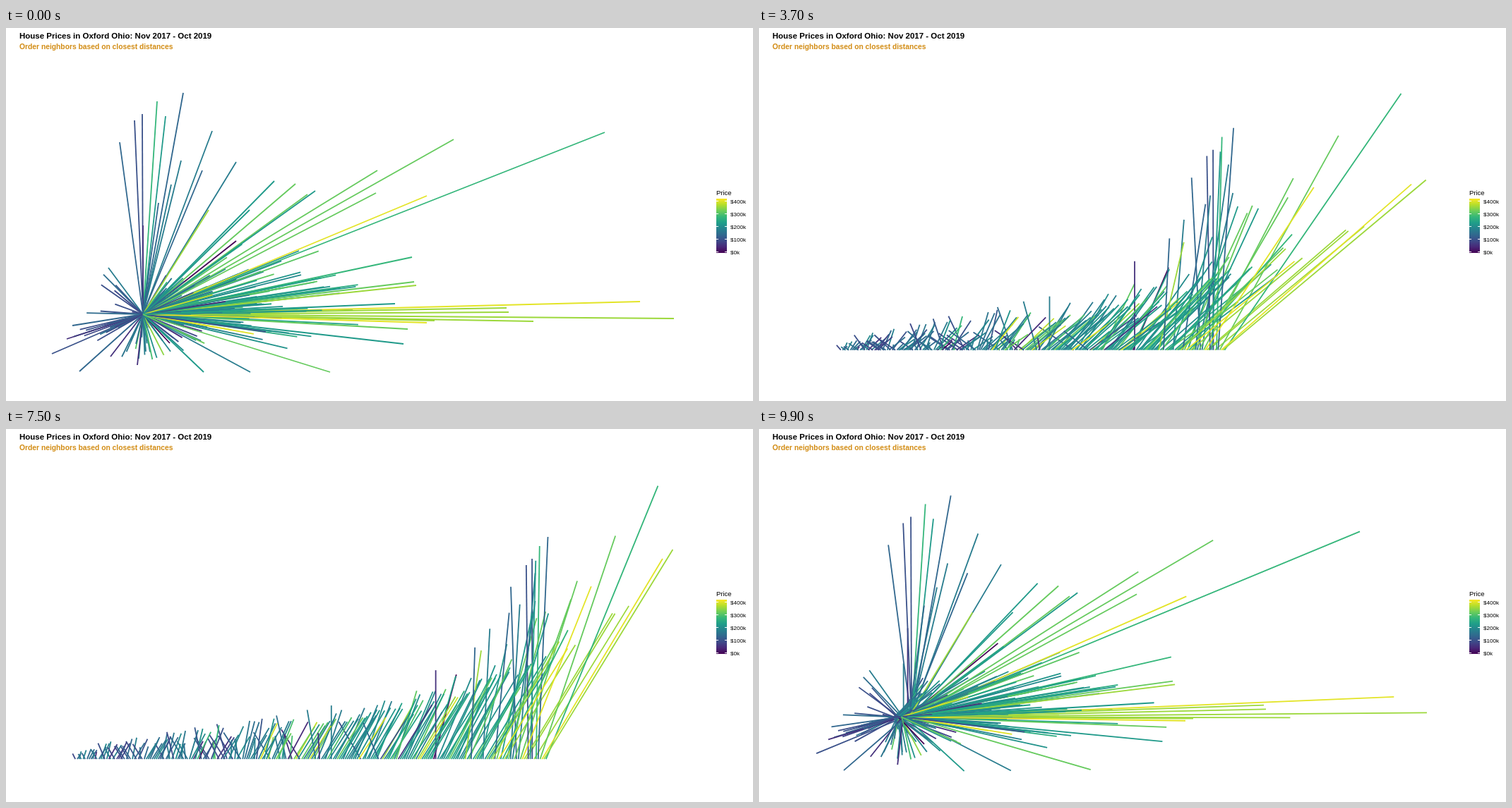
These frames come from a looping animation (1058 px wide and 529 px high, 10 s). An HTML page with a canvas:

```html
<!DOCTYPE html>
<html lang="en">
<head>
<meta charset="utf-8">
<title>House prices</title>
<style>
  html, body { margin: 0; width: 100%; height: 100%; overflow: hidden; background: #fff; }
  canvas, svg { position: absolute; left: 0; top: 0; }
  text { font-family: "Liberation Sans", Arial, sans-serif; }
</style>
</head>
<body>
<canvas id="plot" width="1058" height="529"></canvas>
<svg id="labels" width="1058" height="529">
  <defs><linearGradient id="scale" x1="0" y1="1" x2="0" y2="0"></linearGradient></defs>
  <text x="19" y="15" font-size="11.5" font-weight="bold">House Prices in Oxford Ohio: Nov 2017 - Oct 2019</text>
  <text x="19" y="30" font-size="10.3" font-weight="bold" fill="#d28c14">Order neighbors based on closest distances</text>
  <text x="1006" y="237" font-size="9.5">Price</text>
  <rect x="1006" y="242" width="15" height="77" fill="url(#scale)"/>
</svg>
<script>
const CX = 194, CY = 406, BASE = 488, LEFT = 67.5, RIGHT = 947.5;
const X_SCALE = 0.524; // distance units per horizontal pixel
const VIRIDIS = ["#440154", "#482878", "#3e4a89", "#31688e", "#26828e",
                 "#1f9e89", "#35b779", "#6ece58", "#b5de2b", "#fde725"];

// Outlying houses: price level, then x, y pairs
const OUTLIERS = [
  [0, 326,302, 232,447],
  [.14, 86,441, 148,466, 186,478, 194,280],
  [.25, 182,131, 193,122, 65,462],
  [.33, 161,162, 251,92, 216,248, 278,202, 94,422, 104,487],
  [.42, 234,222, 248,188, 292,146, 326,190, 346,488, 145,340, 194,330],
  [.54, 226,125, 345,258, 380,217, 438,231, 551,391, 563,448, 280,488],
  [.66, 214,104, 848,148, 575,325],
  [.76, 410,221, 526,202, 524,234, 634,158, 578,360, 569,427, 459,488, 427,236],
  [.85, 287,258, 581,365, 709,397, 712,403, 747,416, 607,415, 946,412],
  [.96, 596,238, 898,388, 596,418]
];
// Sorted distances of the remaining houses, at even steps of rank
const CURVE = [9, 25, 31, 37, 43, 50, 56, 61, 67, 76, 87, 97, 114, 132, 165];
const POOL = 203;

let seed = 4711;
const rnd = () => (seed = seed * 16807 % 2147483647) / 2147483647;
const between = (a, b) => a + (b - a) * rnd();
const mix = (a, b, p) => a + (b - a) * p;

function knots(list, u) {
  const k = Math.max(0, Math.min(u, 1)) * (list.length - 1);
  const i = Math.min(Math.floor(k), list.length - 2);
  return [list[i], list[i + 1], k - i];
}

function colour(v) {
  const [a, b, p] = knots(VIRIDIS, v);
  const part = (c, i) => parseInt(c.slice(i, i + 2), 16);
  return `rgb(${[1, 3, 5].map(i => Math.round(mix(part(a, i), part(b, i), p)))})`;
}

function house(x, y, v) {
  const dist = Math.hypot((x - CX) * X_SCALE, y - CY);
  return { x, y, dist, ink: colour(v), order: rnd() };
}

function direction(dist) {
  if (dist > 66) return -30 + 45 * (rnd() + rnd());
  const r = rnd();
  if (r < .14) return between(203, 228);
  if (r < .5) return between(-110, -15);
  if (r < .93) return between(-15, 75);
  return between(115, 185);
}

function priceLevel(dist, deg) {
  const r = rnd();
  if (deg > 110) return between(.2, .42);
  if (r < .08) return between(.1, .28);
  if (dist > 40 && r > .91) return between(.82, .96);
  if (dist > 40 && r > .77) return between(.66, .78);
  return .34 + .2 * Math.min(dist / 120, 1) + between(-.07, .09);
}

const houses = OUTLIERS.flatMap(([v, ...xy]) =>
  xy.flatMap((x, i) => i % 2 ? [] : [house(x, xy[i + 1], v)]));

const pool = Array.from({ length: POOL }, (_, i) => mix(...knots(CURVE, i / (POOL - 1))));
// Each nearby outlier takes one place of the curve
for (const { dist } of houses) {
  if (dist > 149) continue;
  const gaps = pool.map(d => Math.abs(d - dist));
  pool.splice(gaps.indexOf(Math.min(...gaps)), 1);
}
for (const dist of pool) {
  const deg = direction(dist), a = deg * Math.PI / 180;
  houses.push(house(CX + dist * Math.cos(a) / X_SCALE, CY - dist * Math.sin(a),
                    priceLevel(dist, deg)));
}
houses.sort((a, b) => a.dist - b.dist)
  .forEach((h, i) => h.slot = mix(LEFT, RIGHT, i / (houses.length - 1)));
houses.sort((a, b) => a.order - b.order);

// Legend
const SVG = "http://www.w3.org/2000/svg";
function add(parent, tag, attrs, text = "") {
  const el = document.createElementNS(SVG, tag);
  for (const k in attrs) el.setAttribute(k, attrs[k]);
  el.textContent = text;
  parent.append(el);
}
const labels = document.getElementById("labels");
VIRIDIS.forEach((c, i) => add(document.getElementById("scale"), "stop",
  { offset: i / (VIRIDIS.length - 1), "stop-color": c }));
for (let i = 0; i < 5; i++) {
  const y = 317.5 - 18 * i;
  add(labels, "path", { d: `M1006 ${y}h3m9 0h3`, stroke: "#fff" });
  add(labels, "text", { x: 1026, y: y + 3.5, "font-size": 8.1 }, `$${i}${i ? "00" : ""}k`);
}

const ctx = document.getElementById("plot").getContext("2d");
ctx.lineWidth = 1.8;

function draw(now) {
  const t = Math.floor(now % 10000 / 100) * 100;
  const p = Math.max(0, Math.min((t - 1600) / 3400, 1, (10000 - t) / 3300));
  ctx.clearRect(0, 0, 1058, 529);
  for (const h of houses) {
    ctx.strokeStyle = h.ink;
    ctx.beginPath();
    ctx.moveTo(mix(CX, h.slot, p), mix(CY, BASE, p));
    ctx.lineTo(mix(h.x, h.slot, p), mix(h.y, BASE - h.dist, p));
    ctx.stroke();
  }
}

const start = performance.now();
function tick() {
  draw(performance.now() - start);
  requestAnimationFrame(tick);
}
tick();
</script>
</body>
</html>
```
